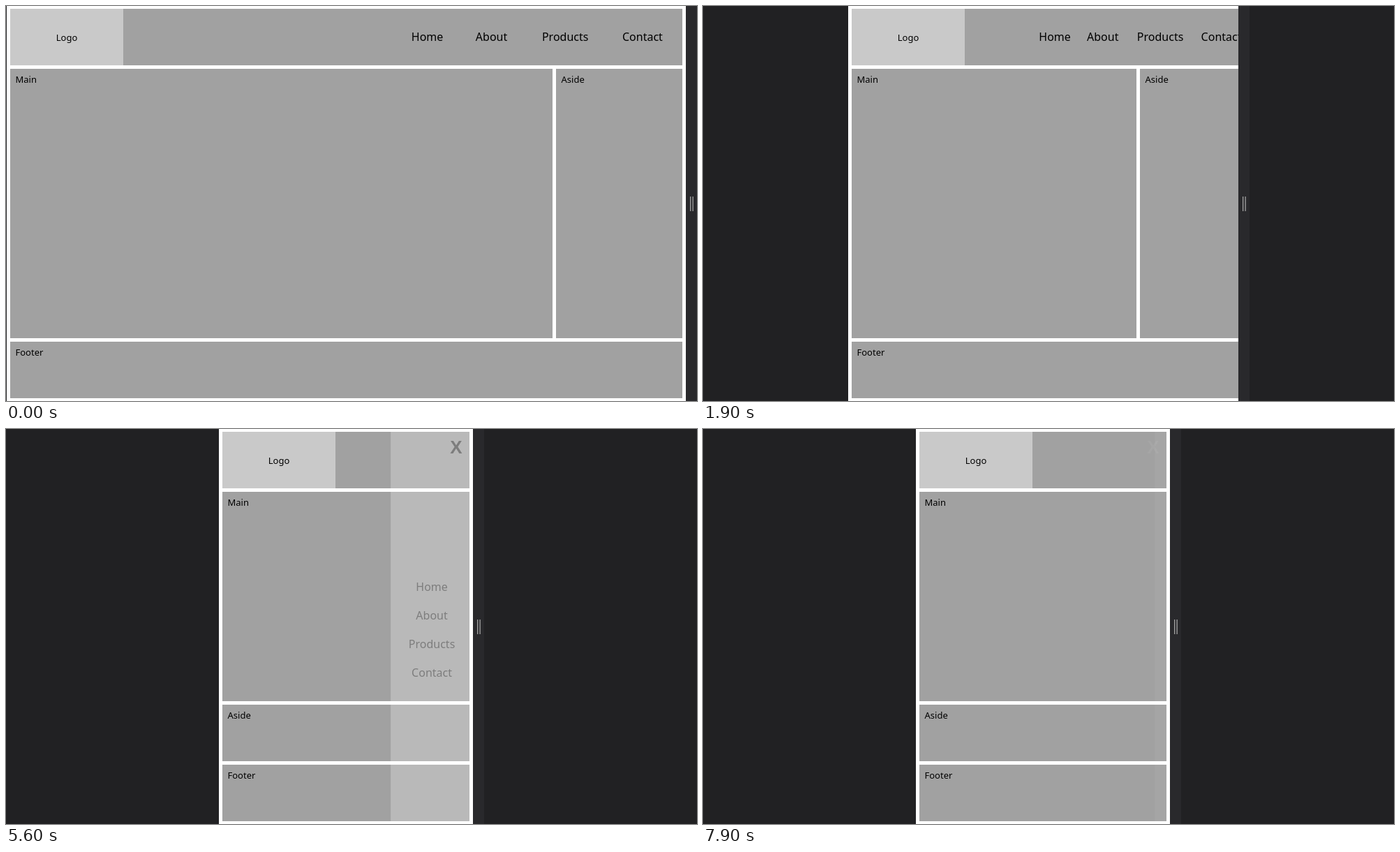
These frames come from a looping animation (990x566 px, 8 s). An HTML page with a canvas:

```html
<!DOCTYPE html>
<html lang="en">
<head>
<meta charset="utf-8">
<title>Responsive layout</title>
<style>
  html, body { margin: 0; width: 100%; height: 100%; overflow: hidden; background: #212123; }
  canvas { display: block; }
</style>
</head>
<body>
<canvas id="stage" width="990" height="566"></canvas>
<script>
const ctx = document.getElementById('stage').getContext('2d');
const LOOP = 8000, STEP = 100;
const LINKS = ['Home', 'About', 'Products', 'Contact'];
const FONT = '"Noto Sans", "Open Sans", sans-serif';
const BREAKPOINT = 486, MIN_CONTENT = 575, LOGO_WIDTH = 162;

// Time and left edge of the resized viewport
const edgeKeys = [
  [400, 0.5], [1300, 101.9], [1900, 207.9], [2200, 233],
  [2800, 273.2], [3100, 289], [3700, 305.4]
];
const slopes = edgeKeys.slice(1).map(([t, x], i) => (x - edgeKeys[i][1]) / (t - edgeKeys[i][0]));

// Harmonic mean of neighbouring slopes keeps the curve monotone
function tangent(i) {
  if (i === 0) return 0.02;
  if (i === slopes.length) return 0.01;
  return 2 * slopes[i - 1] * slopes[i] / (slopes[i - 1] + slopes[i]);
}

function leftEdge(t) {
  const last = edgeKeys.length - 1;
  if (t <= edgeKeys[0][0]) return edgeKeys[0][1];
  if (t >= edgeKeys[last][0]) return edgeKeys[last][1];
  const i = edgeKeys.findIndex(key => key[0] > t) - 1;
  const [t0, x0] = edgeKeys[i], [t1, x1] = edgeKeys[i + 1];
  const d = t1 - t0, u = (t - t0) / d, v = 1 - u;
  return x0 * v * v * (1 + 2 * u) + x1 * u * u * (3 - 2 * u)
       + d * u * v * (v * tangent(i) - u * tangent(i + 1));
}

// CSS "ease" timing: cubic-bezier(.25, .1, .25, 1)
function ease(x) {
  if (x <= 0) return 0;
  if (x >= 1) return 1;
  const bezier = (s, a, b) => 3 * (1 - s) * s * ((1 - s) * a + s * b) + s ** 3;
  let low = 0, high = 1;
  for (let i = 0; i < 20; i++) {
    const mid = (low + high) / 2;
    if (bezier(mid, 0.25, 0.25) < x) low = mid; else high = mid;
  }
  return bezier(low, 0.1, 1);
}

function box(color, x, y, w, h) {
  ctx.fillStyle = color;
  ctx.fillRect(x, y, w, h);
}

function label(text, x, y, size = 13, align = 'left') {
  ctx.fillStyle = '#000';
  ctx.font = `500 ${size}px ${FONT}`;
  ctx.textAlign = align;
  ctx.fillText(text, x, y);
}

function panel(text, x, y, w, h) {
  box('#a1a1a1', x, y, w, h);
  label(text, x + 7.5, y + 20);
}

function drawNav(right, width) {
  const nav = width - LOGO_WIDTH, gap = nav * 0.06;
  const start = right - gap / 2 - 2 - 217 - 3 * gap;
  [0, 44, 91, 158].forEach((offset, i) => label(LINKS[i], start - 1 + offset + i * gap, 50, 16));
}

function drawMenu(right, viewWidth, open) {
  const width = viewWidth * open, left = right - width;
  ctx.save();
  ctx.globalAlpha = 0.8 * open;
  box('#fff', left, 0, width, 566);
  ctx.globalAlpha = open;
  if (width > 70) LINKS.forEach((link, i) => label(link, left + width / 2, 232 + 41 * i, 16, 'center'));
  ctx.font = 'bold 26px "Liberation Sans", Arial, sans-serif';
  ctx.textAlign = 'center';
  ctx.fillText('X', right - 24, 35);
  ctx.restore();
}

function drawPage(left, right, t) {
  const viewWidth = right - left, mobile = viewWidth < BREAKPOINT;
  const x = left + 5;
  const width = mobile ? viewWidth - 10 : Math.max(viewWidth - 10, MIN_CONTENT);

  ctx.save();
  ctx.beginPath();
  ctx.rect(left, 0, viewWidth, 566);
  ctx.clip();
  box('#fff', left, 0, viewWidth, 566);

  box('#a1a1a1', x, 4, width, 81);
  box('#c9c9c9', x, 4, LOGO_WIDTH, 81);
  label('Logo', x + LOGO_WIDTH / 2, 49.5, 13, 'center');

  if (mobile) {
    panel('Main', x, 90, width, 300);
    panel('Aside', x, 395, width, 81);
    if (t < 5600) for (const y of [37, 45, 53]) box('#000', right - 29, y, 18.5, 2.3);
  } else {
    const aside = Math.round(181 - 0.05 * (963 - width));
    panel('Main', x, 90, width - aside - 5, 386);
    panel('Aside', x + width - aside, 90, aside, 386);
    drawNav(x + width, width);
  }
  panel('Footer', x, 481, width, 81);

  const open = ease((t - 5515) / 400) - ease((t - 7620) / 400);
  if (open > 0) drawMenu(right, viewWidth, open);
  ctx.restore();
}

function draw(now) {
  const t = Math.floor(now % LOOP / STEP) * STEP;
  const edge = leftEdge(t);
  const left = Math.round(edge), right = Math.round(974.5 - edge);

  box('#212123', 0, 0, 990, 566);
  box('#29292c', right, 0, 16, 566);
  for (const offset of [6, 9.5]) box('#a3a3a3', right + offset, 273, 1.3, 21);
  drawPage(left, right, t);
}

const begin = performance.now();
function tick() {
  draw(performance.now() - begin);
  requestAnimationFrame(tick);
}
tick();
</script>
</body>
</html>
```
